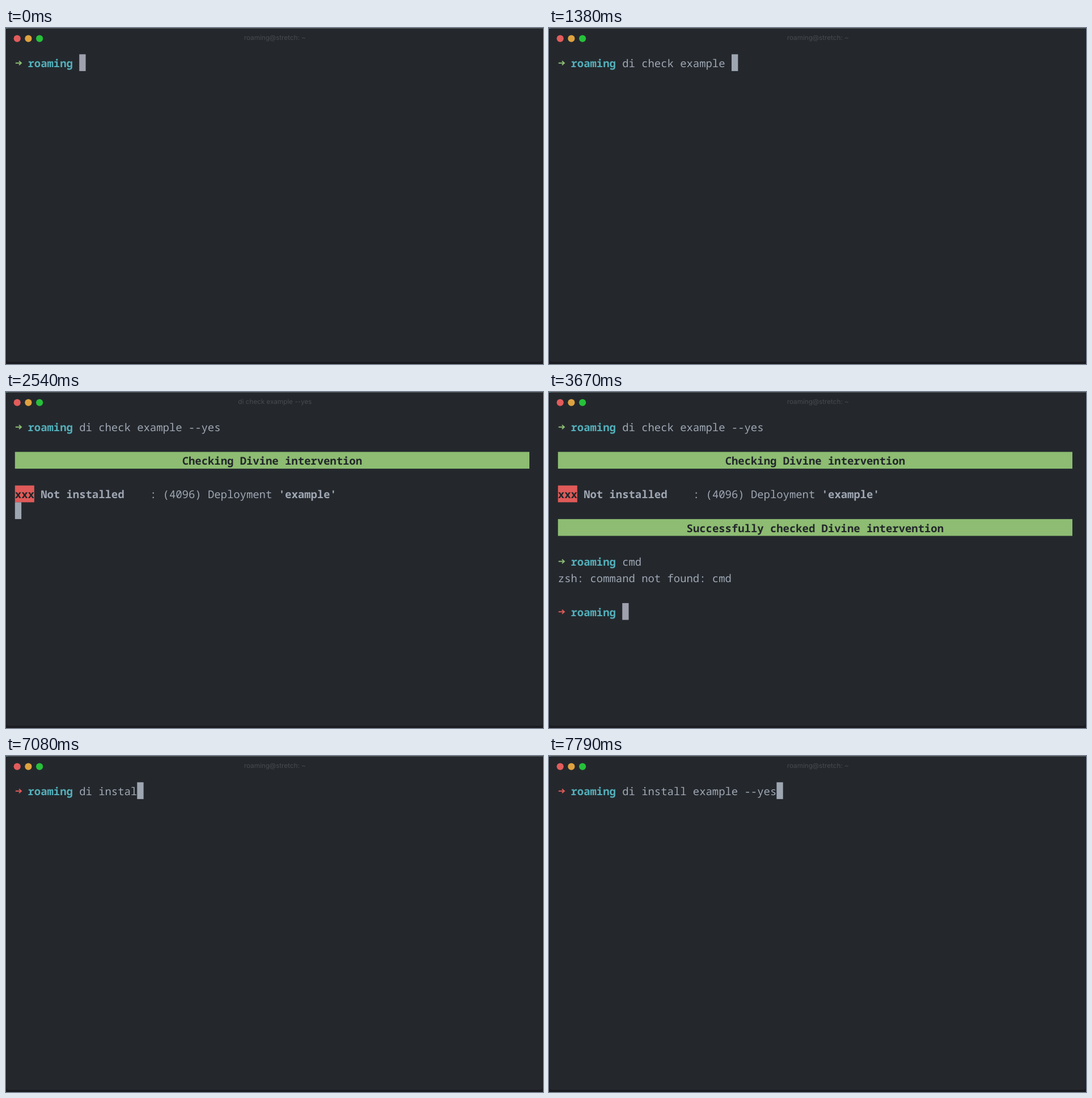
Animation of 947 by 592 pixels, one loop 8000 ms. Source, as an HTML page:

```html
<!DOCTYPE html>
<html lang="en">
<head>
<meta charset="utf-8">
<title>Terminal</title>
<style>
  html, body { margin: 0; width: 100%; height: 100%; overflow: hidden; background: #24282d; }
  svg { display: block; width: 947px; height: 592px; }
  text { white-space: pre; text-rendering: geometricPrecision; }
  #screen text { font: 18.9px "Noto Sans Mono", "DejaVu Sans Mono", monospace; }
  #screen .bold { font-weight: 700; }
  #title { font: 11.7px Inter, "Open Sans", sans-serif; fill: #484c51; text-anchor: middle; }
</style>
</head>
<body>
<svg viewBox="0 0 947 592">
  <rect width="947" height="592" fill="#1b1c21"/>
  <path d="M1 1H946V584Q946 588 942 588H5Q1 588 1 584Z" fill="#24282d"/>
  <path d="M0 .5H947" stroke="#565b60"/>
  <path d="M0 .5H3" stroke="#4f8890"/>
  <circle cx="19.7" cy="18.6" r="6.1" fill="#e25c5b"/>
  <circle cx="39.4" cy="18.6" r="6.1" fill="#dfa23f"/>
  <circle cx="59.1" cy="18.6" r="6.1" fill="#27c13b"/>
  <text id="title" x="474.3" y="20.6"></text>
  <g id="screen"></g>
</svg>
<script>
const LOOP = 8000, LEFT = 15.8, TOP = 46.3, CELL = 11.34, ROW = 29.6;
const USER = "roaming";
const GREEN = "#8dbc72", RED = "#df5a58", CYAN = "#53afba", GREY = "#9fa7b3", DARK = "#22262a";
const CHECK = "di check example --yes", INSTALL = "di install example --yes";

const title = document.getElementById("title");
const screen = document.getElementById("screen");

const colX = col => LEFT + col * CELL;
const rowY = row => TOP + row * ROW;

const text = (row, col, str, fill = GREY, bold = false) =>
  `<text x="${colX(col)}" y="${rowY(row) + 22.6}" fill="${fill}"${bold ? ' class="bold"' : ""}>${str}</text>`;

const block = (row, col, cells, fill) =>
  `<rect x="${colX(col)}" y="${rowY(row)}" width="${cells * CELL}" height="${ROW}" fill="${fill}"/>`;

const cursor = (row, col, fill = "#9ea6b1") => block(row, col, 1, fill);

const banner = (row, col, str) => block(row, 0, 80, GREEN) + text(row, col, str, DARK, true);

function prompt(row, color, typed, active) {
  const y = rowY(row) + 15.4;
  const arrow = `<path d="M${LEFT + 1} ${y}h10m-3.8 -3.6l4 3.6l-4 3.6" fill="none" stroke="${color}" stroke-width="1.9"/>`;
  return arrow + text(row, 2, USER, CYAN, true) + text(row, 10, typed) +
    (active ? cursor(row, 10 + typed.length, typed ? undefined : "#9fa1ae") : "");
}

const status = row =>
  block(row, 0, 3, RED) + text(row, 0, "xxx", DARK, true) +
  text(row, 4, "Not installed", GREY, true) + text(row, 21, ": (4096) Deployment") +
  text(row, 41, "'example'", GREY, true);

// Each pace is [time, characters shown]; counts are interpolated between them.
function typedAt(t, str, paces) {
  let count = 0;
  paces.forEach(([start, from], i) => {
    if (t < start) return;
    const [end, to] = paces[i + 1] || [start + 1, from];
    count = from + Math.floor((to - from) * Math.min(1, (t - start + .5) / (end - start)));
  });
  return str.slice(0, count);
}

function draw(t) {
  if (t >= 6170)
    return prompt(0, RED, typedAt(t, INSTALL, [[6710, 1], [7080, 9], [7500, 19], [7540, 20], [7710, 24]]), true);
  if (t < 2000)
    return prompt(0, GREEN, typedAt(t, CHECK, [[630, 1], [880, 7], [920, 8], [1420, 18], [1460, 19], [1585, 22]]), true);

  let out = prompt(0, GREEN, CHECK, false);
  if (t < 2330) return out + cursor(1, 0);
  out += banner(2, 26, "Checking Divine intervention");
  if (t < 2540) return out + cursor(3, 0);
  out += status(4);
  if (t < 2580) return out + cursor(5, 0);
  out += banner(6, 20, "Successfully checked Divine intervention");
  if (t < 2630) return out + cursor(7, 0);
  const running = t < 3670;
  out += prompt(8, GREEN, typedAt(t, "cmd", [[3250, 1], [3340, 3]]), running);
  if (running) return out;
  return out + text(9, 0, "zsh: command not found: cmd") + prompt(11, RED, "", true);
}

let shown = "";
function render(t) {
  const markup = draw(t);
  if (markup === shown) return;
  shown = markup;
  screen.innerHTML = markup;
  title.textContent = t >= 2000 && t < 2630 ? CHECK : USER + "@stretch: ~";
}

const began = performance.now();
function tick() {
  render((performance.now() - began) % LOOP);
  requestAnimationFrame(tick);
}
tick();
</script>
</body>
</html>
```
